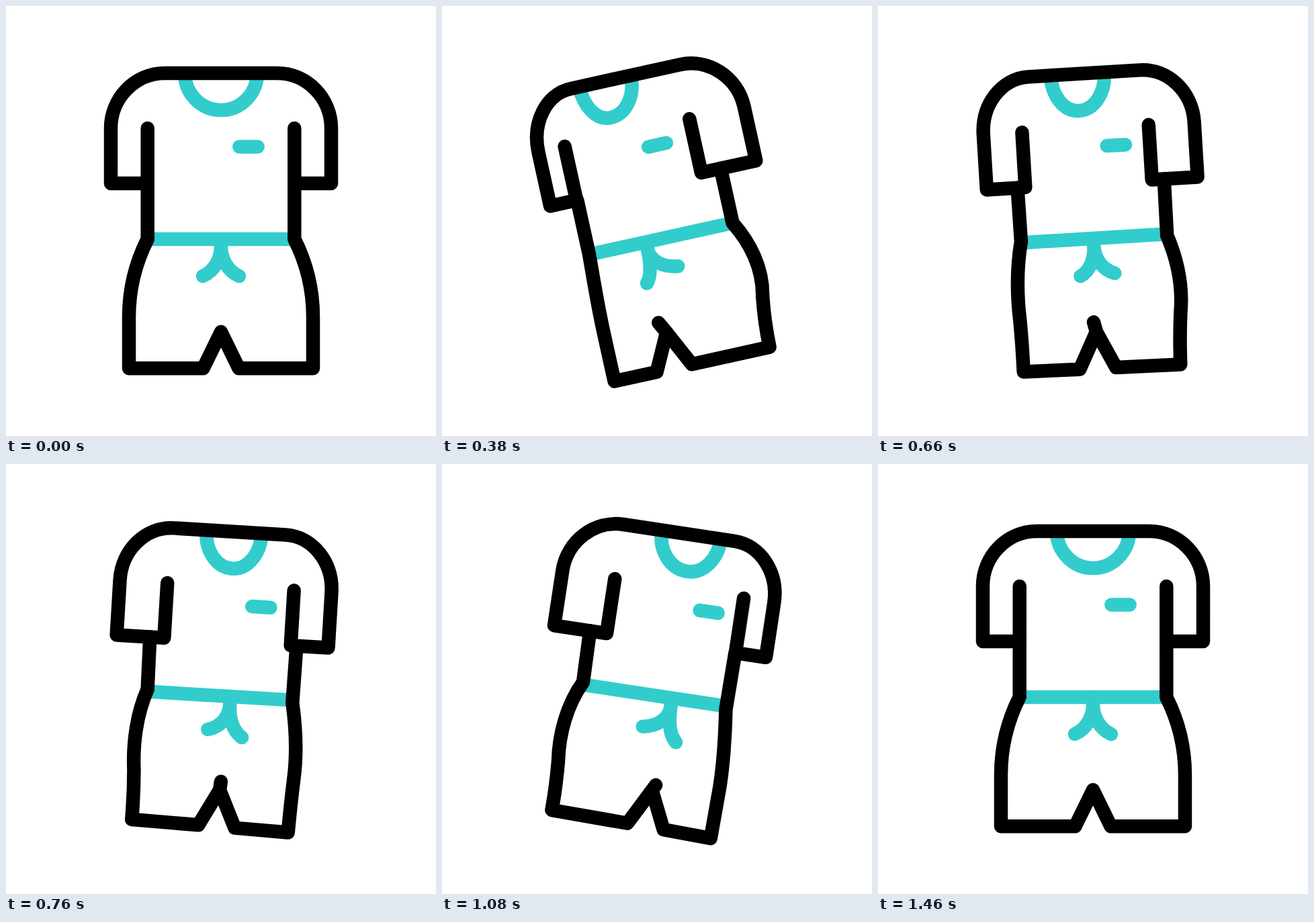
These frames come from a looping animation (640x640 px, 2400 ms). An HTML page:

```html
<!DOCTYPE html>
<html lang="en">
<head>
<meta charset="utf-8">
<title>Sports kit</title>
<style>
  html, body { margin: 0; height: 100%; overflow: hidden; background: #fff; }
  svg { display: block; width: 100vw; height: 100vh; }
  path { fill: none; stroke-width: 20.5; stroke-linecap: round; stroke-linejoin: round; }
  #neck, #belt { stroke-linecap: butt; }
</style>
</head>
<body>
<svg viewBox="-320 -320 640 640">
  <g id="kit">
    <g stroke="#3cc">
      <path id="neck"/><path id="belt"/><path id="cord"/><path id="badge"/>
    </g>
    <g stroke="#000">
      <path id="shirt"/><path id="shorts"/>
    </g>
  </g>
</svg>
<script>
const LOOP = 2400, STEP = 20;
const LEFT_AT = 440, RIGHT_AT = 940, REST_AT = 1467;
const LEFT_ANGLE = -13.1, RIGHT_ANGLE = 10.4;
const el = id => document.getElementById(id);

function ease(t, from, to) {
  const u = Math.min(1, Math.max(0, (t - from) / (to - from)));
  return u * u * (3 - 2 * u);
}

function draw(t) {
  // Weights of the left-turned and right-turned poses
  const swing = ease(t, LEFT_AT, RIGHT_AT);
  const left = ease(t, 0, LEFT_AT) * (1 - swing);
  const right = swing * (1 - ease(t, RIGHT_AT, REST_AT));

  // Point: x, y, then x shifts and y shifts for the left and right poses
  const point = ([x, y, lx = 0, rx = 0, ly = 0, ry = 0]) =>
    (x + lx * left + rx * right).toFixed(2) + ' ' + (y + ly * left + ry * right).toFixed(2);
  const path = (parts, ...points) =>
    parts.reduce((d, part, i) => d + point(points[i - 1]) + part);
  const set = (id, d) => el(id).setAttribute('d', d);

  el('kit').setAttribute('transform', `rotate(${LEFT_ANGLE * left + RIGHT_ANGLE * right})`);

  set('neck', path`M${[-54, -220, -17, 34]}
    C${[-54, -190, -17, 34]} ${[-30, -165, -27, 29]} ${[0, -165, -36, 25]}
    C${[30, -165, -42, 18]} ${[54, -190, -48, 11]} ${[54, -220, -48, 11]}`);

  set('belt', path`M${[-105, 27, 0, 0, 0, -2.7]} L${[105, 27, 0, 0, 0, -2.7]}`);

  set('cord', path`M${[-27, 82, -8, 20, 5.5, -10.7]}
    C${[-9, 74, -16, 25, 2.5, -5]} ${[0, 55, -24, 32]} ${[0, 38, -24, 32]}
    L${[0, 30, -24, 32]} L${[0, 38, -24, 32]}
    C${[0, 55, -24, 32]} ${[9, 74, -17, 24, -5, 4]} ${[27, 82, -11.5, 18, -10, 8.5]}`);

  set('badge', path`M${[27.3, -110.5, -17, 24.6]} L${[54.7, -110.5, -17, 24.6]}`);

  set('shirt', path`M${[-109.3, -138, -1, 30.3]} L${[-109.3, -56, -1, 30.3]}
    L${[-164, -56, 14.4, 1]} L${[-164, -138, 14.4, 1]}
    C${[-164, -183, 14.4, 1]} ${[-128, -220, 8, 0.5]} ${[-83.5, -220]}
    L${[83.5, -220]}
    C${[128, -220, -0.4, -6]} ${[164, -183, -0.8, -10.4]} ${[164, -138, -0.8, -10.4]}
    L${[164, -56, -0.8, -10.4]} L${[109.3, -56, -31, 0.5]} L${[109.3, -138, -31, 0.5]}`);

  const waistL = [-109.3, 27, 0, 1.5, 0, -7], waistR = [109.3, 27, 0, -1.5, 0, 3];
  const crotch = [0, 165, -23, 21];
  set('shorts', path`M${[-109.3, -56]} L${waistL}
    C${[-127, 62, 17, 0, 0, -5]} ${[-137, 103, 25, 6]} ${[-137, 143, 25, 12]}
    Q${[-137, 181, 25, 15]} ${[-137, 219.3, 25, 13.7, 0, -3.7]}
    L${[-26.5, 219.3, -23.5, 18.2, 0, -0.5]} L${crotch}
    L${[0, 165, -32, 26.3, -17.5, -10.5]} L${crotch}
    L${[26.5, 219.3, -23, 20, 0, 1]} L${[137, 219.3, -14.5, -27.5, 0, 4]}
    Q${[137, 181, -14, -26]} ${[137, 143, -8, -25]}
    C${[137, 103, 2, -25]} ${[127, 62, 2, -18]} ${waistR}
    L${[109.3, -56]}`);
}

function tick() {
  const t = performance.now() % LOOP;
  draw(Math.floor(t / STEP) * STEP);
  requestAnimationFrame(tick);
}
tick();
</script>
</body>
</html>
```
